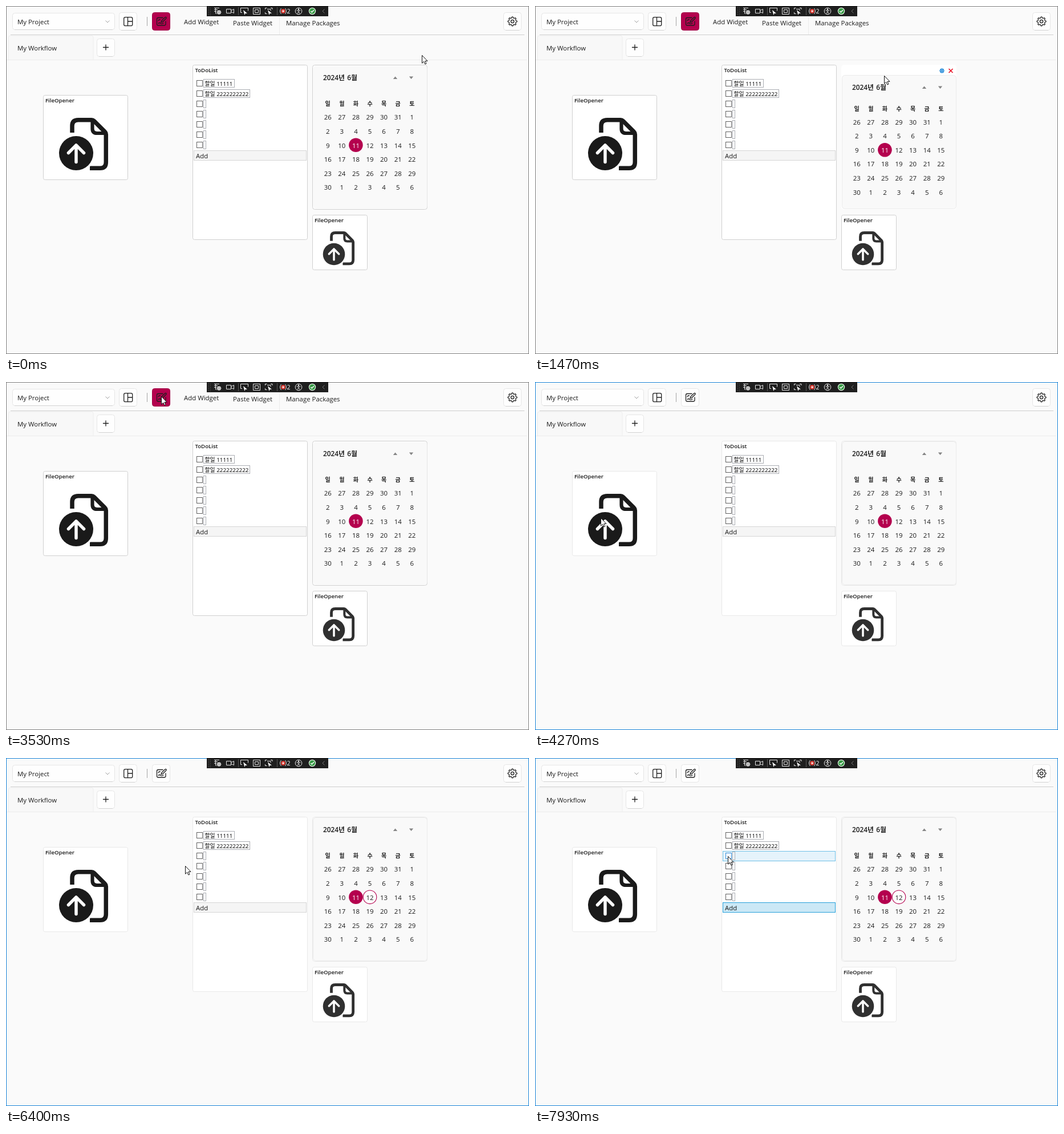
These frames come from a looping animation (917 by 610 pixels, 8000 ms). An HTML page:

```html
<!DOCTYPE html>
<html lang="ko">
<head>
<meta charset="utf-8">
<title>Workflow widgets</title>
<style>
html, body { margin: 0; width: 100%; height: 100%; overflow: hidden; background: #fafafa; }
svg { display: block; }
text { font: 11.4px "Open Sans", "Noto Sans CJK KR", "Noto Sans CJK", sans-serif; fill: #1a1a1a; }
.mid { text-anchor: middle; }
.name { font-size: 9.6px; font-weight: 600; }
.month { font-size: 11.8px; font-weight: 600; word-spacing: 1.5px; }
.week { font-size: 10px; font-weight: 600; }
.todo { font-size: 9.85px; fill: #000; }
.count { font-size: 10.5px; fill: #fff; }
.today { fill: #fff; }
.btn { fill: #fefefe; stroke: #e6e6e6; }
.line { fill: none; stroke: #1f1f1f; stroke-width: 1.3; stroke-linecap: round; stroke-linejoin: round; }
.bar { fill: none; stroke: #e4e4e4; }
.card { fill: #fff; stroke: #d0d0d0; }
.run .card { stroke: #e8e8e8; }
.hover .card { stroke: #fff; }
.head, .run .edit { display: none; }
.hover .head { display: inline; }
.inner { fill: #f9f9f9; stroke: none; }
.hover .inner, .run .inner { stroke: #ebebeb; }
.frame { fill: none; stroke: #7f7f7f; }
.run .frame { stroke: #1883d7; }
.toggle { fill: #b4004e; stroke: #a00045; }
.run .toggle { fill: #fefefe; stroke: #e6e6e6; }
.row { fill: none; stroke: none; }
.row.add { fill: #f5f5f5; stroke: #d6d6d6; }
.row.over { fill: #e5f3fb; stroke: #70c0e7; }
.row.picked { fill: #cbe8f6; stroke: #26a0da; }
.check { fill: #fff; stroke: #606060; }
.check.over { fill: #f3f9ff; stroke: #3a8fd8; }
.field { fill: #fff; stroke: #abadb3; }
</style>
</head>
<body>
<svg id="stage" width="917" height="610" viewBox="0 0 917 610"></svg>
<script>
const STEP = 1000 / 15, STEPS = 120;
const CLICK_MODE = 54, PICK_DAY = 84, PICK_ADD = 107, OVER_CHECK = 116;

// Pointer path: step, x, y
const PATH = [
  [0, 729, 86], [3, 680, 200], [6, 600, 420], [8, 545, 475], [10, 430, 380],
  [13, 221, 250], [14, 245, 200], [16, 350, 170], [18, 450, 120], [20, 560, 86],
  [22, 612, 122], [24, 640, 160], [26, 655, 150], [29, 600, 90], [31, 480, 75],
  [35, 200, 85], [39, 35, 127], [41, 25, 150], [43, 90, 200], [46, 200, 160],
  [49, 360, 40], [51, 290, 16], [53, 272, 25], [56, 272, 25], [60, 190, 130],
  [64, 115, 238], [65, 106, 250], [68, 220, 290], [71, 400, 230], [73, 560, 96],
  [75, 761, 140], [78, 613, 225], [81, 640, 233], [83, 640, 233], [87, 587, 259],
  [89, 630, 245], [90, 630, 245], [93, 480, 215], [96, 314, 189], [98, 232, 170],
  [100, 345, 246], [102, 345, 246], [105, 345, 255], [109, 345, 255],
  [114, 337, 172], [118, 337, 172], [119, 338, 172]
];

const range = n => [...Array(n).keys()];
const text = (x, y, s, cls = '') => `<text x="${x}" y="${y}" class="${cls}">${s}</text>`;
const rect = (x, y, w, h, cls, r = 0, more = '') =>
  `<rect x="${x}" y="${y}" width="${w}" height="${h}" rx="${r}" class="${cls}" ${more}/>`;
const path = (d, cls = 'line', more = '') => `<path d="${d}" class="${cls}" ${more}/>`;
const disc = (x, y, r, fill) => `<circle cx="${x}" cy="${y}" r="${r}" fill="${fill}"/>`;
const button = (x, y, cls = 'btn') => rect(x + .5, y + .5, 31, 31, cls, 4)
  + (cls === 'btn' ? path(`M${x + 4} ${y + 31.5}h24`, '', 'stroke="#d2d2d2"') : '');

function gear(x, y, r, color) {
  const pts = range(32).map(i => {
    const a = (i - .5) * Math.PI / 16, q = i % 4 < 2 ? r : r * .77;
    return (x + q * Math.sin(a)).toFixed(2) + ' ' + (y - q * Math.cos(a)).toFixed(2);
  });
  return `<g fill="none" stroke="${color}" stroke-width="1.3" stroke-linejoin="round">
    <path d="M${pts.join('L')}Z"/><circle cx="${x}" cy="${y}" r="${r * .33}"/></g>`;
}

const head = (x, y, w) => `<g class="head">${gear(x + w - 25.5, y + 10.5, 3.6, '#1e88d8')}
  ${path(`M${x + w - 13.5} ${y + 7}l7 7m0 -7l-7 7`, '', 'stroke="#e81123" stroke-width="1.6"')}</g>`;

function toolbar() {
  return path('M8 50.5H909', '', 'stroke="#cfcfcf"')
    + rect(4, 52, 149, 42, '', 3, 'fill="#f8f8f8"')
    + path('M4.5 94V55q0-3 3-3H150q3 0 3 3V94', '', 'fill="none" stroke="#eee"')
    + path('M1 94.5H913', '', 'stroke="#ebebeb"')
    + rect(11.5, 12.5, 179, 29, 'btn', 4) + path('M15 41.5H187', '', 'stroke="#d2d2d2"')
    + path('M174.5 25.5l3.5 3.5l3.5-3.5', '', 'fill="none" stroke="#a0a0a0"')
    + text(20, 32, 'My Project') + text(20, 78, 'My Workflow')
    + button(198, 11) + rect(206.7, 19.7, 15, 15, 'line', 2.5) + path('M213.5 20V34.5M213.5 27H221.5')
    + path('M247.5 19V35', '', 'stroke="#a5a5a5"')
    + button(256, 11, 'toggle')
    + path('M275 20.5H267q-2.5 0-2.5 2.5v8.5q0 2.5 2.5 2.5h10.5q2.5 0 2.5-2.5V27'
      + 'M272 28.5l.8-2.8l6.2-6q1.2-.8 2 .3q.6 1-.2 1.8l-6 6z'
      + 'M267 25.5q2-2.5 3.5-1.5M267 30.5q3-2 4 0q2 1.5 5-.5')
    + `<g class="edit">${text(312, 32, 'Add Widget')}${text(398, 33.5, 'Paste Widget')}
       ${text(491, 33.5, 'Manage Packages')}${path('M479.5 18V50', '', 'stroke="#ececec"')}</g>`
    + button(872, 11) + gear(888, 27, 8, '#1f1f1f')
    + button(159, 57) + path('M170.5 72.5h9M175 68v9');
}

function darkBar() {
  const bar = (d, more = '') => path(d, 'bar', more);
  const arrow = x => path(`M${x} 7l7 6h-3.6l-1 3z`, '', 'fill="#fff"');
  return rect(352, 0, 213, 18, '', 0, 'fill="#1f1f1f"')
    + bar('M355.5 2V16M358.5 3V16', 'stroke-dasharray="1 2" style="stroke:#666"')
    + bar('M365 3.5h9M365 6.5h6M365 9.5h4M367.5 4v9h2') + gear(373.5, 11, 3.2, '#e4e4e4')
    + bar('M386.5 5.5h8v7h-8zM394.5 8l5-2.5v7l-5-2.5')
    + bar('M407.5 2V16M475.5 2V16', 'style="stroke:#555"')
    + bar('M414 11.5h-2.5v-8h13v5') + arrow(416)
    + bar('M433.5 3.5h12v11h-12zM436.5 6.5h6v5h-6z')
    + bar('M454.5 6V3.5h3M464 3.5h3V6M454.5 11v2.5h3M458 5.5h6v3') + arrow(459)
    + bar('M482.5 4q-4 5 0 10M489.5 4q4 5 0 10')
    + disc(486, 9, 4, '#d8423a') + disc(486, 9, 1.5, '#fff')
    + text(492.5, 13, '2', 'count')
    + '<circle cx="513" cy="9" r="5.8" class="bar"/>' + disc(513, 5.8, 1.2, '#fff')
    + bar('M509.5 8h7M513 8v2l-2 3.3M513 10l2 3.3')
    + disc(537, 9, 6.2, '#e6f5e6') + disc(537, 9, 5, '#379a45')
    + bar('M534.3 9l2 2l3.6-4', 'style="stroke:#fff;stroke-width:1.4"')
    + bar('M558.5 5.5l-3.5 3.5l3.5 3.5', 'style="stroke:#777"');
}

// File icon drawn around the centre of its round badge
const fileIcon = color => `<g fill="none" stroke="${color}" stroke-width="7.5" stroke-linejoin="round">
  <path d="M-7 -36V-48Q-7 -58.300 3.500 -58.300H27Q29.500 -58.300 31.500 -56.300L50.300 -37.500Q52.300 -35.500 52.300 -33V16Q52.300 26.300 42 26.300H24"/>
  <path d="M28.500 -57V-43Q28.500 -35 36.500 -35H51" stroke-width="6.2"/></g>`.replace(/00(?=[ A-Z"])/g, '')
  + disc(0, 0, 33.5, '#fff') + disc(0, 0, 30, color)
  + `<path d="M0 15.5V-13M-13.5 -.5L0 -14L13.5 -.5" fill="none" stroke="#fff" stroke-width="5.5"
    stroke-linecap="round" stroke-linejoin="round"/>`;

const opener = (id, x, y, size, cx, cy, scale, color) => `<g id="${id}">
  ${rect(x + .5, y + .5, size, size, 'card', 3)}${head(x, y, size + 1)}
  <g class="shift">${text(x + 4, y + 13, 'FileOpener', 'name')}</g>
  <g class="icon" transform="translate(${cx} ${cy}) scale(${scale})">${fileIcon(color)}</g></g>`;

function todo() {
  const fields = ['할일 11111', '할일 2222222222', '', '', '', '', ''];
  const widths = [54, 81];
  const rows = fields.map((s, i) => {
    const y = 127 + 18 * i;
    return rect(329.5, y + .5, 197, 17, 'row')
      + rect(334.5, y + 3.5, 10, 10, 'check')
      + rect(346.5, y + 1.5, widths[i] || 4, 14, 'field', 0, s ? '' : 'fill-opacity=".5"')
      + text(348.5, y + 12.7, s, 'todo');
  }).join('');
  return `<g id="todo">${rect(327.5, 103.5, 201, 306, 'card', 3)}${head(327, 103, 202)}
    <g class="shift">${text(331.5, 116, 'ToDoList', 'name')}${rows}
    ${rect(329.5, 253.5, 197, 17, 'row add')}${text(333, 267, 'Add')}</g></g>`;
}

function calendar() {
  const col = c => (564.2 + 24.6 * c).toFixed(1), line = r => (199.3 + 24.6 * r).toFixed(1);
  const days = range(42).map(i => {
    const n = i < 6 ? 26 + i : (i - 6) % 30 + 1;
    return text(col(i % 7), line(i / 7 | 0), n, i === 16 ? 'mid today' : 'mid');
  }).join('');
  const week = [...'일월화수목금토'].map((s, c) => text(col(c), 174.5, s, 'mid week')).join('');
  return `<g id="cal">${rect(537.5, 103.5, 201, 253, 'card', 4)}${head(537, 103, 202)}
    <rect id="sheet" class="inner" x="538.5" y="104.5" width="200" height="251" rx="5"/>
    <g id="month">${text(556, 130, '2024년 6월', 'month')}
      ${path('M678.8 128l3.7-4.5l3.7 4.5zM706.8 123.5l3.7 4.5l3.7-4.5z', '', 'fill="#858585"')}</g>
    <g id="week">${week}</g>
    <g id="days">${disc(613.4, 243.8, 12.3, '#b4004e')}
      <circle id="ring" cx="638" cy="243.8" r="11.8" fill="#fdfdfd" stroke="#b4004e" stroke-width="1.1"/>${days}</g></g>`;
}

const stage = document.getElementById('stage');
stage.innerHTML = rect(0, 0, 917, 610, '', 0, 'fill="#fafafa"')
  + toolbar()
  + opener('big', 65, 156, 148, 123, 258, 1, '#1a1a1a')
  + todo() + calendar()
  + opener('small', 537, 366, 96, 575, 435, .643, '#303030')
  + rect(.5, .5, 916, 609, 'frame') + darkBar()
  + '<path id="pointer" d="M.5 .5V14.2L3.7 11.2L5.9 16L8 15L5.9 10.4H10Z" fill="#fff" stroke="#111"/>';

const $ = id => document.getElementById(id);
const rows = [...document.querySelectorAll('.row')];
const checks = [...document.querySelectorAll('.check')];
const widgets = [
  { id: 'big', box: [65, 156, 214, 305], icon: [123, 258, 1] },
  { id: 'todo', box: [327, 103, 529, 410] },
  { id: 'cal', box: [537, 103, 739, 357] },
  { id: 'small', box: [537, 366, 634, 462], icon: [575, 435, .643] }
];
const moveY = (el, y) => el.setAttribute('transform', `translate(0 ${y})`);

// Monotone cubic interpolation along the pointer path
function slope(i, k) {
  const a = PATH[i - 1], b = PATH[i], c = PATH[i + 1];
  if (!a || !c) return 0;
  const p = (b[k] - a[k]) / (b[0] - a[0]), q = (c[k] - b[k]) / (c[0] - b[0]);
  return p * q > 0 ? 2 * p * q / (p + q) : 0;
}
function pointAt(n) {
  const next = PATH.findIndex(p => p[0] > n);
  const i = (next < 0 ? PATH.length - 1 : next) - 1;
  const a = PATH[i], b = PATH[i + 1], d = b[0] - a[0], u = (n - a[0]) / d;
  return [1, 2].map(k => Math.round(
    a[k] + (b[k] - a[k]) * u * u * (3 - 2 * u)
    + d * u * (1 - u) * (slope(i, k) * (1 - u) - slope(i + 1, k) * u)));
}

function draw(n) {
  const [x, y] = pointAt(n), run = n >= CLICK_MODE;
  stage.classList.toggle('run', run);
  $('pointer').setAttribute('transform', `translate(${x} ${y})`);

  for (const { id, box: [l, t, r, b], icon } of widgets) {
    const el = $(id), on = !run && x >= l && x < r && y >= t && y < b;
    el.classList.toggle('hover', on);
    if (id === 'cal') {
      $('sheet').setAttribute('y', on ? 121.5 : 104.5);
      $('sheet').setAttribute('height', on ? 234 : 251);
      moveY($('month'), on ? 17 : 0);
      moveY($('week'), on ? 9 : 0);
      moveY($('days'), on ? 8.4 : 0);
    } else moveY(el.querySelector('.shift'), on ? 18 : 0);
    if (icon) {
      const [cx, cy, s] = icon;
      el.querySelector('.icon').setAttribute('transform',
        `translate(${cx} ${cy + (on ? 8 * s : 0)}) scale(${on ? s * .86 : s})`);
    }
  }

  const over = run && x >= 329 && x < 527 ? Math.floor((y - 127) / 18) : -1;
  rows.forEach((row, i) => {
    row.classList.toggle('over', i === over);
    row.classList.toggle('picked', i === 7 && n >= PICK_ADD);
  });
  checks[2].classList.toggle('over', n >= OVER_CHECK);
  $('ring').style.display = n >= PICK_DAY ? '' : 'none';
}

function tick() {
  draw(Math.floor((performance.now() + 4) / STEP) % STEPS);
  requestAnimationFrame(tick);
}
tick();
</script>
</body>
</html>
```
